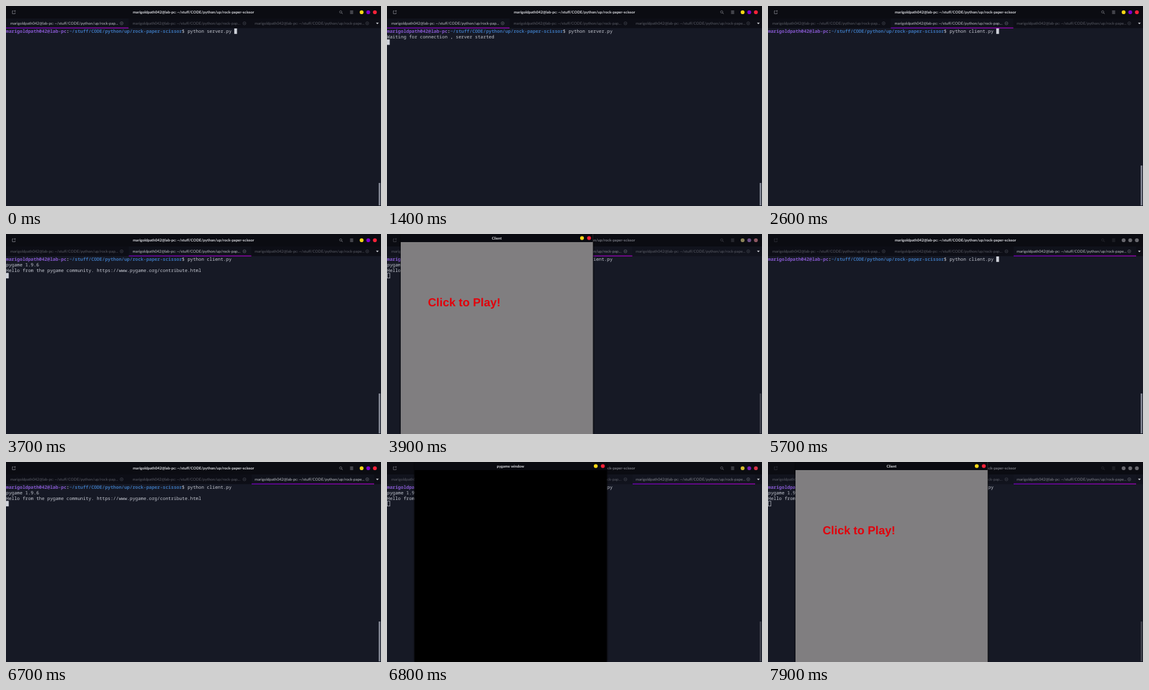
An HTML page with a canvas that plays this animation: 600x321 px, repeating every 8 s.

```html
<!DOCTYPE html>
<html lang="en">
<head>
<meta charset="utf-8">
<title>Terminal session</title>
<style>
html, body { margin: 0; width: 100%; height: 100%; overflow: hidden; background: #161925; }
canvas { display: block; }
</style>
</head>
<body>
<canvas id="stage" width="600" height="321"></canvas>
<script>
const ctx = document.getElementById('stage').getContext('2d');
const LOOP = 8000, STEP = 100, BLINK = 520, FADE = 200;
const HOST = 'marigoldpath042@lab-pc', DIR = '~/stuff/CODE/python/up/rock-paper-scissor';
const CELL = 4.4, ROW = 8.8, TOP = 36;
const MONO = '"Noto Sans Mono", monospace', UI = 'Lato, sans-serif', GAME = '"Liberation Sans", Arial, sans-serif';
const GREY = [104, 104, 110], YELLOW = [248, 214, 20], PURPLE = [125, 0, 205], RED = [250, 34, 56];
const PYGAME = ['pygame 1.9.6', 'Hello from the pygame community. https://www.pygame.org/contribute.html'];

// Each tab: when it is opened, Enter is pressed, and the output arrives (ms)
const TABS = [
  { open: 0, enter: 100, print: 200, command: 'python server.py', output: ['Waiting for connection , server started'], thumb: 284 },
  { open: 2400, enter: 3200, print: 3600, command: 'python client.py', output: PYGAME, thumb: 256 },
  { open: 5700, enter: 6200, print: 6600, command: 'python client.py', output: PYGAME, thumb: 256 },
];
// Each game window: when it appears, shows its menu, is clicked and is covered again
const WINDOWS = [
  { x: 22, show: 3800, ready: 3900, joined: 4400, hide: 5700 },
  { x: 44, show: 6800, ready: 6900, joined: LOOP, hide: LOOP },
];

const rgb = c => `rgb(${c.map(Math.round)})`;
const mix = (a, b, k) => rgb(a.map((v, i) => v + (b[i] - v) * k));

function rect(x, y, w, h, color) {
  ctx.fillStyle = color;
  ctx.fillRect(x, y, w, h);
}

function text(str, x, y, font, color, align = 'left') {
  ctx.font = font;
  ctx.fillStyle = color;
  ctx.textAlign = align;
  ctx.fillText(str, x, y);
}

function dot(x, y, color) {
  ctx.fillStyle = color;
  ctx.beginPath();
  ctx.arc(x, y, 3.1, 0, 7);
  ctx.fill();
}

function ring(x, y, r, color) {
  ctx.strokeStyle = color;
  ctx.lineWidth = 0.7;
  ctx.beginPath();
  ctx.arc(x, y, r, 0, 7);
  ctx.stroke();
}

function stroke(color, width, ...lines) {
  ctx.strokeStyle = color;
  ctx.lineWidth = width;
  ctx.beginPath();
  for (const [x, y, ...rest] of lines) {
    ctx.moveTo(x, y);
    for (let i = 0; i < rest.length; i += 2) ctx.lineTo(rest[i], rest[i + 1]);
  }
  ctx.stroke();
}

// One terminal row on a fixed cell grid
function cells(str, col, row, color, weight = 400) {
  [...str].forEach((ch, i) =>
    text(ch, (col + i) * CELL, TOP + row * ROW + 6.9, `${weight} 7.33px ${MONO}`, color));
}

function cursor(col, row, focused) {
  const x = col * CELL, y = TOP + row * ROW;
  if (focused) return rect(x, y, CELL, ROW, '#cfd2da');
  ctx.strokeStyle = '#aeb1bb';
  ctx.lineWidth = 0.8;
  ctx.strokeRect(x + 0.5, y + 0.5, CELL - 0.2, ROW - 1);
}

function header(focused, glow) {
  rect(0, 0, 600, 20, '#0b0c12');
  text(`${HOST}: ${DIR}`, 300, 12, `700 6.05px ${UI}`, focused ? '#dcdde2' : '#777982', 'center');
  const icon = mix([48, 49, 57], [134, 135, 143], glow);
  stroke(icon, 0.8, [12, 7.8, 10.2, 7.8, 10.2, 12.4, 14.6, 12.4, 14.6, 10.5], [13, 8, 15.5, 8], [14.2, 6.8, 14.2, 9.3]);
  ring(535.5, 9.5, 1.8, icon);
  stroke(icon, 0.9, [536.9, 10.9, 538.6, 12.6]);
  stroke(icon, 0.9, [550.5, 8, 555.5, 8], [550.5, 10, 555.5, 10], [550.5, 12, 555.5, 12]);
  [YELLOW, PURPLE, RED].forEach((c, i) => dot(569 + i * 10.6, 10, mix(GREY, c, glow)));
}

function tabBar(active, focused) {
  rect(0, 20, 600, 15.5, focused ? '#0d0e16' : '#11131d');
  TABS.forEach((tab, i) => {
    const x = i * 196.5, on = tab === active;
    const label = on ? (focused ? '#c2c4cb' : '#83858e') : '#5b5d67';
    const close = on ? '#666872' : '#464852';
    if (on) {
      rect(x, 20, 196, 15, focused ? '#10121b' : '#131520');
      const line = ctx.createLinearGradient(x, 0, x + 196, 0);
      line.addColorStop(0, '#7800c0');
      line.addColorStop(1, '#a004ba');
      rect(x, 34.6, 196, 1.3, line);
    }
    text(`${HOST}: ${DIR.slice(0, i < 2 ? -10 : -9)}...`, x + 7 - i, 30, `400 6.15px ${UI}`, label);
    const cx = x + 185, cy = 27.8;
    ring(cx, cy, 2.4, close);
    stroke(close, 0.6, [cx - 1, cy - 1, cx + 1, cy + 1], [cx + 1, cy - 1, cx - 1, cy + 1]);
  });
  ctx.fillStyle = '#d0d2d8';
  ctx.beginPath();
  ctx.moveTo(592, 26.8);
  ctx.lineTo(596.4, 26.8);
  ctx.lineTo(594.2, 29.2);
  ctx.fill();
}

function shell(tab, t, focused) {
  const entered = t >= tab.enter;
  const lines = t >= tab.print ? tab.output : [];
  cells(HOST, 0, 0, '#8658cf', 700);
  cells(':', 22, 0, '#c6c9d2', 700);
  cells(DIR, 23, 0, '#3a72b4', 700);
  cells('$ ' + tab.command, 64, 0, '#c6c9d2');
  lines.forEach((line, i) => cells(line, 0, i + 1, '#c6c9d2'));

  // Blinking restarts with every key press or tab switch
  const sinceInput = t - (entered ? tab.enter : tab.open);
  const lit = Math.floor(sinceInput / BLINK) % 2 === 0;
  if (lit || !focused) cursor(entered ? 0 : 83, entered ? lines.length + 1 : 0, focused);
  rect(596.3, tab.thumb, 2.6, 320 - tab.thumb, focused ? '#868a98' : '#43454f');
}

function gameWindow({ x, ready, joined }, t) {
  const isReady = t >= ready;
  ctx.shadowColor = '#000';
  ctx.shadowBlur = 3;
  rect(x, 0, 307.5, 321, isReady ? '#807e80' : '#000');
  ctx.shadowBlur = 0;
  rect(x, 0, 307.5, 13, '#090a10');
  text(isReady ? 'Client' : 'pygame window', x + 153.7, 8.6, `700 6px ${UI}`, '#dcdde2', 'center');
  dot(x + 290, 6.5, rgb(YELLOW));
  dot(x + 301.3, 6.5, rgb(RED));
  if (t >= joined) text('Waiting for Player...', x + 37, 174, `700 25px ${GAME}`, '#e2000b');
  else if (isReady) text('Click to Play!', x + 43.5, 115.8, `700 18.5px ${GAME}`, '#e2000b');
}

// Colour of the header buttons: 1 focused, 0 behind a game window
function buttonGlow(t) {
  const ramp = start => Math.min(1, Math.max(0, (t - start) / FADE));
  return WINDOWS.reduce((glow, w) => glow - ramp(w.show - 50) + ramp(w.hide), 1);
}

function draw(t) {
  const tab = TABS.findLast(item => t >= item.open);
  const game = WINDOWS.find(w => t >= w.show && t < w.hide);
  rect(0, 0, 600, 321, '#161925');
  header(!game, buttonGlow(t));
  tabBar(tab, !game);
  shell(tab, t, !game);
  if (game) gameWindow(game, t);
}

ctx.textRendering = 'geometricPrecision';
ctx.fontKerning = 'none';
function frame() {
  draw(Math.floor(performance.now() % LOOP / STEP) * STEP);
  requestAnimationFrame(frame);
}
frame();
</script>
</body>
</html>
```
